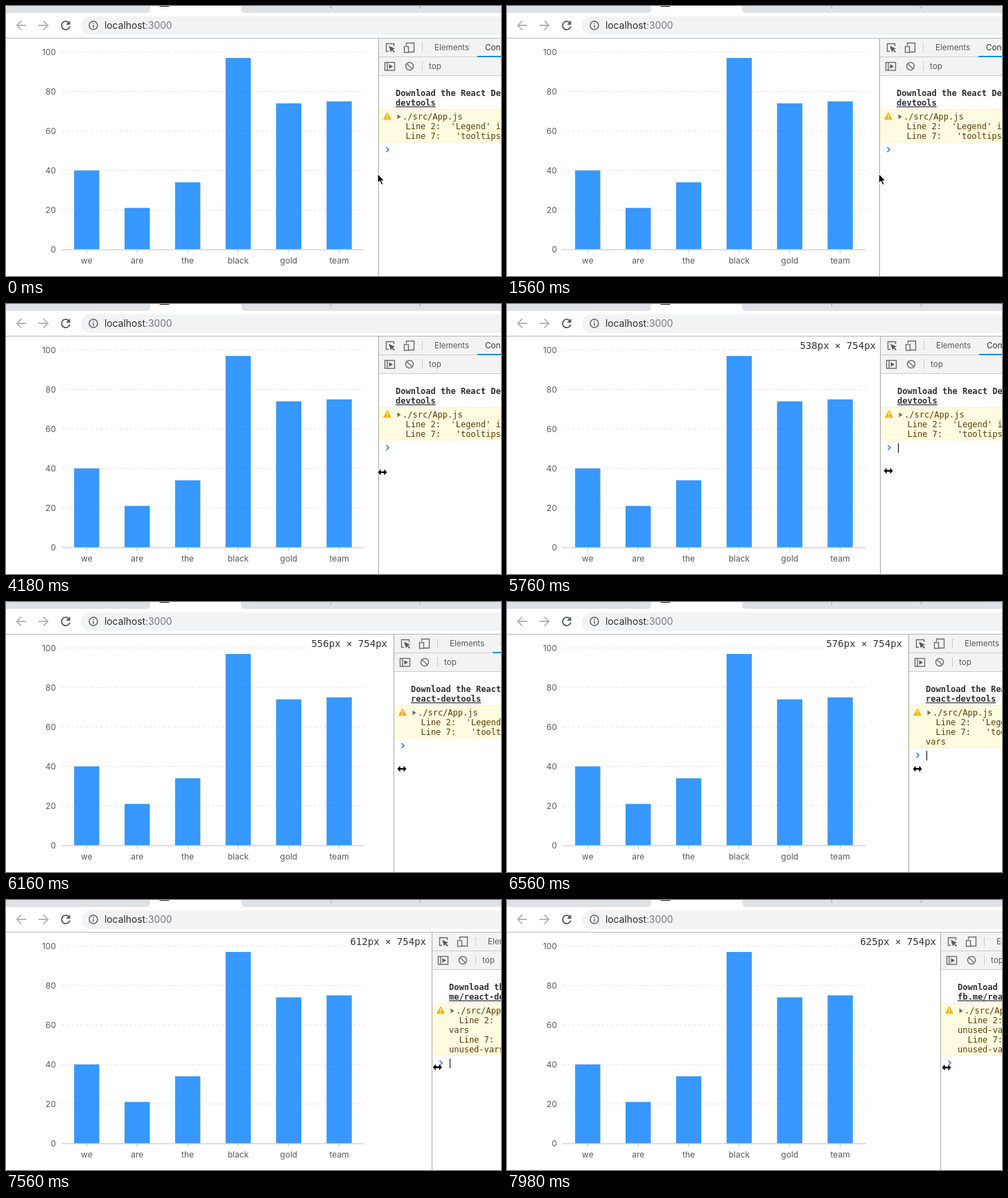
An HTML page that plays this animation: 714x390 px, repeating every 8000 ms.

```html
<!DOCTYPE html>
<html lang="en">
<head>
<meta charset="utf-8">
<title>Bar chart beside a resizing console</title>
<style>
html, body { margin: 0; width: 100%; height: 100%; overflow: hidden; background: #fff; }
svg { display: block; }
text { font: 12px Inter, Roboto, sans-serif; white-space: pre; fill: #595959; }
.ui { font-size: 11.6px; }
.mono { font: 12px "DejaVu Sans Mono", monospace; fill: #5c3c00; }
.bold { font-weight: bold; fill: #303030; }
.link { text-decoration: underline; }
.size { font: 14px "DejaVu Sans Mono", monospace; fill: #333; }
.icon { fill: none; stroke: #6b6b6b; stroke-width: 1.4; }
</style>
</head>
<body>
<svg width="714" height="390" viewBox="0 0 714 390">
  <!-- browser bar -->
  <path fill="#dee1e6" d="M0 0H208V4Q208 10 202 10H0ZM339 0H714V10H345Q339 10 339 4Z"/>
  <path stroke="#a5a8ad" d="M468.5 0V4M597.5 0V4"/>
  <rect x="221" y="-4" width="15" height="5" rx="2" fill="#222"/>
  <rect x="108" y="15" width="640" height="27" rx="13.5" fill="#f1f3f4"/>
  <path stroke="#b6b6b6" d="M0 46.5H714"/>
  <g fill="none" stroke="#b4b6b8" stroke-width="1.8">
    <path d="M29 28H16M22 21.5L15.500 28L22 34.500M47 28H60M54 21.5L60.500 28L54 34.500"/>
    <path stroke="#55585c" d="M90.500 24A6 6 0 1 0 92 29.500"/>
    <circle cx="126" cy="28" r="6" stroke="#5f6368" stroke-width="1.5"/>
    <path stroke="#5f6368" stroke-width="1.5" d="M126 24.500V26M126 27.300V31.500"/>
  </g>
  <path fill="#55585c" d="M92.500 21V27H86.500Z"/>
  <text x="142" y="33" style="font-size:13.8px;fill:#2b2c2f">localhost<tspan fill="#75797e">:3000</tspan></text>

  <g id="chart"></g>
  <g id="size">
    <rect x="-122" y="47" width="122" height="26" fill="#fff"/>
    <text id="sizeText" class="size" x="-6" y="65" text-anchor="end"></text>
  </g>

  <!-- developer panel, drawn at its resting place -->
  <g id="panel">
    <rect x="538" y="47" width="200" height="343" fill="#fff"/>
    <rect x="538" y="47" width="200" height="53" fill="#f3f3f3"/>
    <path stroke="#ccc" d="M538 73.5H738M538 100.500H738M600.500 53V67M600.500 80V94"/>
    <path stroke="#a9a9a9" d="M537.500 47V390"/>
    <rect x="680" y="72" width="60" height="2" fill="#0a8fe8"/>
    <path class="icon" d="M552 65.500H548.500V54.500H559.500V58"/>
    <path fill="#5a5a5a" d="M552 57.500L561 61.500L557.800 62.800L561 66L559.800 67.200L556.600 64L555.200 67Z"/>
    <path class="icon" d="M577.500 57V53.500H588.500V66.500H581"/>
    <rect class="icon" x="574.500" y="58.500" width="6" height="8.500"/>
    <rect class="icon" x="546.500" y="81.500" width="14" height="11.500"/>
    <path class="icon" d="M550 81.500V93"/>
    <path fill="#5a5a5a" d="M552.500 84L558 87.300L552.500 90.600Z"/>
    <circle class="icon" cx="582" cy="87" r="5.500" stroke-width="1.700"/>
    <path class="icon" stroke-width="1.700" d="M578 83.200L586 90.800"/>
    <text class="ui" x="618" y="64">Elements</text>
    <text class="ui" x="691" y="64" style="fill:#333">Console</text>
    <text class="ui" x="610" y="91">top</text>
    <g id="log"></g>
  </g>

  <path id="arrow" d="M0 0V14L3.200 11.200L5.500 16.500L8 15.400L5.700 10.300H10Z" fill="#000" stroke="#fff" stroke-width="1.200"/>
  <path id="resize" d="M-6.500 0L-2.500 -4.500V-1.200H2.500V-4.500L6.500 0L2.500 4.500V1.200H-2.500V4.500Z" fill="#000" stroke="#fff" stroke-width="1.400" paint-order="stroke"/>
</svg>
<script>
const $ = id => document.getElementById(id);
const LOOP = 8000, GRAB = 4060, FOCUS = 5460, RESIZE = 5640, CHAR = 7.224, COLS = 87.2;

// Each key is [time, value, value...]; values are interpolated linearly.
const arrowKeys = [[0, 536, 242], [1540, 536, 242], [1680, 538, 243], [1820, 540, 244.5], [2360, 550, 246],
  [2500, 552, 246], [3440, 552, 246], [3520, 548, 245], [3660, 547, 244.5], [3920, 543, 242], [4060, 541, 241]];
const resizeKeys = [[4060, 544, 244], [4180, 543, 243], [4320, 543, 242.5], [4740, 541, 241], [5460, 541, 241],
  [5760, 550, 241], [6560, 592, 241], [7120, 610, 241], [7980, 634, 242]];
const edgeKeys = [[5640, 537], [5690, 538], [5760, 538.4], [6560, 579], [7060, 597], [7120, 601], [7920, 625]];

function at(keys, t) {
  const i = keys.findIndex(k => k[0] > t);
  if (i === 0) return keys[0].slice(1);
  if (i < 0) return keys.at(-1).slice(1);
  const [a, b] = [keys[i - 1], keys[i]], p = (t - a[0]) / (b[0] - a[0]);
  return a.slice(1).map((v, j) => v + (b[j + 1] - v) * p);
}

function drawChart() {
  const left = 80, right = 517, base = 351.5, unit = 2.85, step = (right - left) / 6;
  const data = { we: 40, are: 21, the: 34, black: 97, gold: 74, team: 75 };
  let out = '';
  for (let v = 0; v <= 100; v += 20) {
    const y = Math.floor(base - v * unit) + .5;
    if (v) out += `<path d="M${left} ${y}H${right}" stroke="#e6e6e6" stroke-dasharray="4 3"/>`;
    out += `<text x="72" y="${y + 4.5}" text-anchor="end">${v}</text>`;
  }
  Object.entries(data).forEach(([name, v], i) => {
    const x = left + step * (i + .5), h = v * unit;
    out += `<rect x="${x - step / 4}" y="${base - h}" width="${step / 2}" height="${h}" fill="rgba(20,134,255,.85)"/>
      <path d="M${x} ${base}v5" stroke="#bfbfbf"/><text x="${x}" y="372" text-anchor="middle">${name}</text>`;
  });
  $('chart').innerHTML = out + `<path d="M${left} ${base + .5}H${right}" stroke="#bfbfbf"/>`;
}

// Breaks text at its "|" marks so that no line exceeds the given columns.
function wrap(text, cols) {
  const lines = [''];
  for (const part of text.split('|')) {
    if (lines.at(-1) && lines.at(-1).length + part.length > cols) lines.push('');
    lines[lines.length - 1] += part;
  }
  return lines;
}

const notice = 'Download the React DevTools for a better development experience: |https://|fb.|me/|react-|devtools';
const lint = (line, name, len) =>
  `  Line ${line}${name} is defined but never used`.padEnd(len - 14) + 'no-|unused-|vars';
const warnings = [lint('2:  ', "'Legend'", 80), lint('7:   ', "'tooltips'", 82)];
const row = (s, y, cls = '', x = 562) => `<text class="mono ${cls}" x="${x}" y="${y}">${s}</text>`;

function drawLog(shift, caret) {
  const cols = COLS - shift / CHAR;
  const lines = warnings.flatMap(w => wrap(w, cols));
  const end = 169 + lines.length * 14, y = end + 10;
  $('log').innerHTML =
    wrap(notice, cols).map((s, i) => row(s, 130 + i * 14, i ? 'bold link' : 'bold')).join('') +
    `<rect x="538" y="149" width="200" height="${end - 149}" fill="#fffbe0"/>
    <path d="M538 149.500H738M538 ${end - .5}H738" stroke="#fff3c0"/>
    <path d="M550 154.500L555 163.500H545Z" fill="#f2b200" stroke="#f2b200" stroke-width="1.500" stroke-linejoin="round"/>
    <path d="M550 156.500V160.500M550 161.500V163" stroke="#fff" stroke-width="1.400"/>
    <path d="M564.500 156.500L569.500 160L564.500 163.500Z" fill="#6e6e6e"/>` +
    row('./src/App.js', 164, '', 572) +
    lines.map((s, i) => row(s, 178 + i * 14)).join('') +
    `<path d="M548.500 ${y - 3}L552 ${y + .5}L548.500 ${y + 4}" fill="none" stroke="#367cf1" stroke-width="1.700"/>` +
    (caret ? `<path d="M563.500 ${y - 6}v14" stroke="#000"/>` : '');
}

const move = (el, x, y) => el.setAttribute('transform', `translate(${x} ${y})`);
const show = (el, on) => el.style.display = on ? '' : 'none';

function frame() {
  const t = performance.now() % LOOP;
  const shift = Math.round(at(edgeKeys, t)[0]) - 537;
  const width = Math.round(at(edgeKeys, t - 60)[0]);  // the readout trails the edge
  move($('panel'), shift, 0);
  drawLog(shift, t >= FOCUS && (t - FOCUS) % 1000 < 500);
  show($('size'), t >= RESIZE);
  move($('size'), width, 0);
  $('sizeText').textContent = `${width}px × 754px`;
  show($('arrow'), t < GRAB);
  show($('resize'), t >= GRAB);
  move($('arrow'), ...at(arrowKeys, t));
  move($('resize'), ...at(resizeKeys, t));
  requestAnimationFrame(frame);
}

drawChart();
frame();
</script>
</body>
</html>
```
